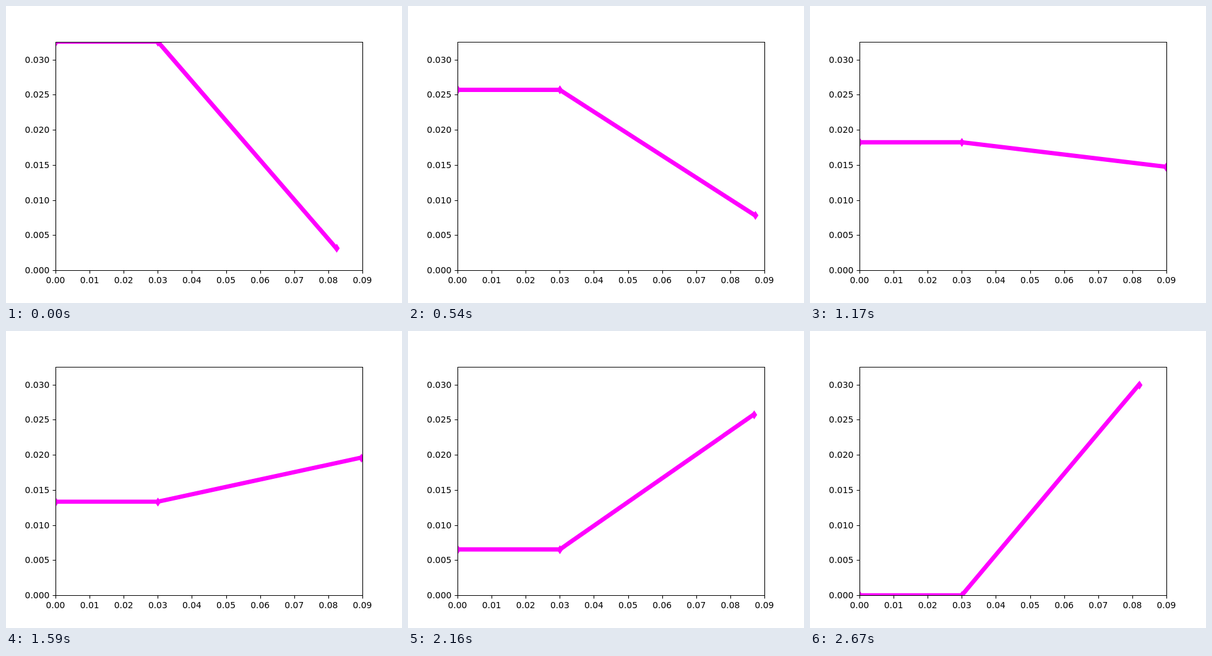
Write an HTML page that moves like this. It is 640x480 px and loops after 2700 ms.

```html
<!DOCTYPE html>
<html lang="en">
<head>
<meta charset="utf-8">
<title>Linkage plot</title>
<style>
  html, body { margin: 0; width: 100%; height: 100%; overflow: hidden; background: #fff; }
  svg { display: block; width: 640px; height: 480px; }
  text { font: 13.889px "DejaVu Sans", sans-serif; fill: #000; }
  .axis { fill: none; stroke: #000; stroke-width: 1.111; }
  .link { fill: none; stroke: #f0f; stroke-width: 6.944; stroke-linecap: square; stroke-linejoin: round; }
  .mark { fill: #f0f; stroke: #f0f; stroke-width: 1.389; stroke-linejoin: miter; }
</style>
</head>
<body>
<svg viewBox="0 0 640 480">
  <defs><clipPath id="area"><rect x="80" y="58" width="497" height="370"/></clipPath></defs>
  <g clip-path="url(#area)">
    <path id="link" class="link"/>
    <path id="marks" class="mark"/>
  </g>
  <g id="axes"></g>
</svg>
<script>
  const FRAMES = 90, STEP = 30;
  const ARM = 0.06, PIVOT = 0.03, RATE = 0.03;
  const LEFT = 80, RIGHT = 576, TOP = 57.6, BOTTOM = 427.2;

  const byId = id => document.getElementById(id);
  const angle = i => (30 - (i + 1) * 60 / FRAMES) * Math.PI / 180;

  // The pivot's speed is proportional to 1 / cos(angle), so its height is the integral of sec.
  const secInt = a => Math.log(Math.tan(Math.PI / 4 + a / 2));
  const height = a => RATE * (secInt(a) + secInt(Math.PI / 6));

  const yMax = height(angle(0));
  const px = x => LEFT + x * (RIGHT - LEFT) / 0.09;
  const py = y => BOTTOM - y * (BOTTOM - TOP) / yMax;
  const snap = v => Math.floor(v + 0.5) + 0.5;

  function add(tag, attrs, text) {
    const el = document.createElementNS("http://www.w3.org/2000/svg", tag);
    for (const key in attrs) el.setAttribute(key, attrs[key]);
    if (text) el.textContent = text;
    byId("axes").appendChild(el);
  }

  function drawAxes() {
    let d = "M80.5 58.5H576.5V427.5H80.5Z";
    for (let i = 0; i <= 9; i++) {
      const x = px(i / 100);
      d += `M${snap(x)} 427.5v5`;
      add("text", { x, y: 448, "text-anchor": "middle" }, (i / 100).toFixed(2));
    }
    for (let i = 0; i <= 6; i++) {
      const y = py(i * 0.005);
      d += `M80.5 ${snap(y)}h-5`;
      add("text", { x: 70.3, y: Math.round(y) + 5, "text-anchor": "end" }, (i * 0.005).toFixed(3));
    }
    add("path", { class: "axis", d });
  }

  const diamond = ([x, y]) => `M${snap(x)} ${snap(y) - 6}l4 6l-4 6l-4 -6Z`;

  function draw(i) {
    const a = angle(i), h = height(a);
    const points = [
      [px(0), py(h)],
      [px(PIVOT), py(h)],
      [px(PIVOT + ARM * Math.cos(a)), py(h - ARM * Math.sin(a))]
    ];
    byId("link").setAttribute("d", "M" + points.map(p => p.join(" ")).join("L"));
    byId("marks").setAttribute("d", points.map(diamond).join(""));
  }

  function tick() {
    draw(Math.floor(performance.now() / STEP) % FRAMES);
    requestAnimationFrame(tick);
  }

  drawAxes();
  draw(0);
  requestAnimationFrame(tick);
</script>
</body>
</html>
```
